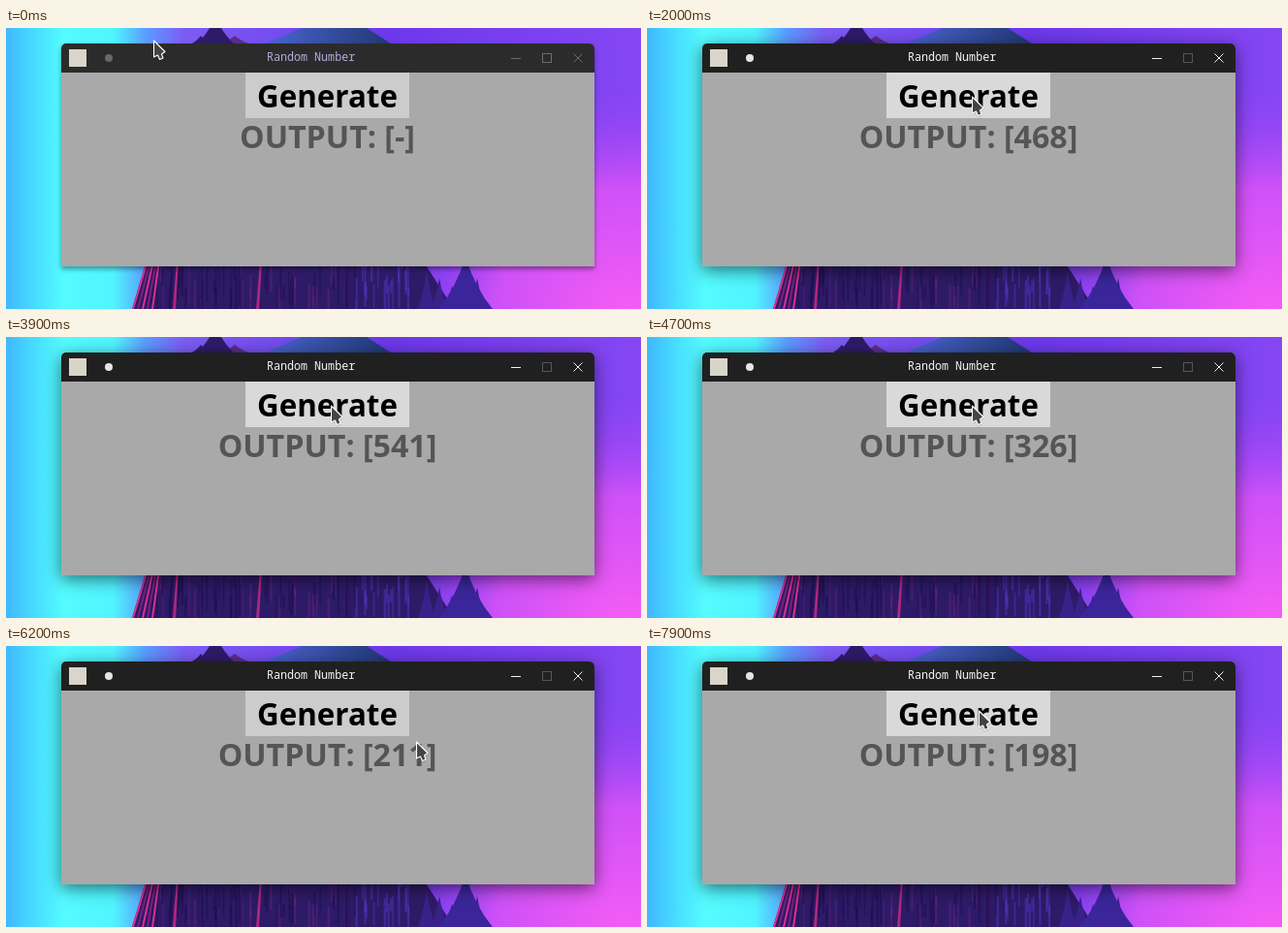
These frames come from a looping animation (655x290 px, 8000 ms). An HTML page with a canvas:

```html
<!DOCTYPE html>
<html lang="en">
<head>
<meta charset="utf-8">
<title>Random Number</title>
<style>
html, body { margin: 0; width: 100%; height: 100%; overflow: hidden; background: #a9a9a9; }
canvas { display: block; width: 655px; height: 290px; }
</style>
</head>
<body>
<canvas id="stage" width="655" height="290"></canvas>
<script>
const W = 655, H = 290, LOOP = 8000, TICK = 100;
const ctx = document.getElementById('stage').getContext('2d');
const win = { x: 57, y: 16, w: 550, h: 230, bar: 30 };
const btn = { x: 247, y: 46, w: 169, h: 47 };
const MID = 331.5, FOCUS = 1500;

// pointer strokes: begin, end, where the tip arrives
const HOME = [153, 13];
const strokes = [
  [200, 700, 238, 143], [700, 1100, 289, 85], [1100, 1300, 333, 67], [1900, 2000, 336, 71],
  [5300, 5400, 322, 77], [5400, 5900, 472, 182], [5900, 6200, 424, 99],
  [6200, 6600, 219, 110], [6800, 7200, 434, 107], [7300, 7700, 343, 67]
];

// clicks come every half second, the first ones a little late, the last after a pause
const values = [372, 468, 806, 154, 67, 541, 326, 211, 198];
const releaseAt = i => i === values.length - 1 ? 7900 : 1400 + 500 * i + Math.max(0, 200 - 100 * i);

const smooth = p => p * p * (3 - 2 * p);

function pointerAt(t) {
  let [x, y] = HOME;
  for (const [from, to, tx, ty] of strokes) {
    if (t <= from) break;
    const p = smooth(Math.min(1, (t - from) / (to - from)));
    x += (tx - x) * p;
    y += (ty - y) * p;
  }
  return [Math.round(x), Math.round(y)];
}

function seeded(seed) {
  return () => (seed = (seed * 16807) % 2147483647) / 2147483647;
}

function addStops(fill, ...stops) {
  stops.forEach(([at, color]) => fill.addColorStop(at, color));
  return fill;
}

function poly(g, fill, ...pts) {
  g.beginPath();
  for (let i = 0; i < pts.length; i += 2) g.lineTo(pts[i], pts[i + 1]);
  g.closePath();
  g.fillStyle = fill;
  g.fill();
}

function spire(g, fill, x, top, half, base) {
  const waist = top + (base - top) * 0.6;
  g.beginPath();
  g.moveTo(x - half, base);
  g.quadraticCurveTo(x - half * 0.35, waist, x, top);
  g.quadraticCurveTo(x + half * 0.35, waist, x + half, base);
  g.fillStyle = fill;
  g.fill();
}

function drawSky(g) {
  g.fillStyle = addStops(g.createLinearGradient(0, 0, W, 0),
    [0, '#40b8ff'], [0.05, '#48e0ff'], [0.09, '#54fbff'], [0.17, '#50f4ff'],
    [0.22, '#5a9cff'], [0.28, '#7c5cf4'], [0.6, '#6c38ea'], [1, '#8646f4']);
  g.fillRect(0, 0, W, H);
  g.fillStyle = addStops(g.createRadialGradient(640, 300, 10, 640, 300, 240),
    [0, '#f45cf4'], [0.55, 'rgba(214,82,248,.9)'], [1, 'rgba(150,66,246,0)']);
  g.fillRect(400, 0, W - 400, H);
}

function drawRocks(g) {
  const rnd = seeded(41), dark = '#2e1b68';
  const facet = addStops(g.createLinearGradient(262, 0, 390, 0), [0, '#4c66d6'], [1, '#243a78']);
  poly(g, facet, 262, 18, 305, 0, 372, 0, 400, 18);
  spire(g, dark, 201, 8, 13, 18);
  spire(g, '#5c2c8c', 236, 8, 20, 18);
  spire(g, dark, 216, -12, 21, 18);

  poly(g, dark, 145, 240, 130, H, 462, H, 430, 240);
  for (let i = 0; i < 5; i++) spire(g, '#38228a', 434 + i * 13, 250 + (i % 3) * 8, 9, H);
  spire(g, '#3a269a', 474, 236, 28, H);

  // vertical grain, bluer towards the right
  for (let i = 0; i < 90; i++) {
    const x = 150 + rnd() * 270, y = 236 + rnd() * 34;
    g.fillStyle = x > 360 ? 'rgba(92,62,214,.4)' : rnd() < 0.3 ? 'rgba(140,40,140,.3)' : 'rgba(24,12,66,.4)';
    g.fillRect(x, y, 1 + rnd() * 1.5, 12 + rnd() * 40);
  }
  // lit edges on the left flank
  for (let i = 0; i < 5; i++) {
    const x = 145 + i * 3, foot = x - 15 + i * 2;
    poly(g, i % 2 ? '#7c2080' : '#e0308e', x, 240, x + 2, 240, foot + 2, H, foot, H);
  }
  for (const x of [176, 262]) poly(g, '#b0287e', x, 240, x + 2, 240, x - 1, H, x - 4, H);
}

function makeWallpaper() {
  const pic = document.createElement('canvas');
  pic.width = W;
  pic.height = H;
  const g = pic.getContext('2d');
  drawSky(g);
  drawRocks(g);
  return pic;
}

const wallpaper = makeWallpaper();

function framePath() {
  ctx.beginPath();
  ctx.roundRect(win.x, win.y, win.w, win.h, [5, 5, 0, 0]);
}

function label(text, x, y, font, color, align = 'center') {
  ctx.font = font;
  ctx.textAlign = align;
  ctx.fillStyle = color;
  ctx.fillText(text, x, y);
}

function line(color, x0, y0, x1, y1) {
  ctx.beginPath();
  ctx.moveTo(x0, y0);
  ctx.lineTo(x1, y1);
  ctx.strokeStyle = color;
  ctx.lineWidth = 1;
  ctx.stroke();
}

function drawWindow(t) {
  const focus = Math.max(0, Math.min(1, (t - FOCUS + TICK) / (2 * TICK)));
  const mix = (a, b) => a + (b - a) * focus;
  const grey = (a, b) => `rgb(${Array(3).fill(Math.round(mix(a, b)))})`;

  ctx.save();
  ctx.shadowColor = `rgba(0,0,0,${mix(0.38, 0.55)})`;
  ctx.shadowBlur = mix(5, 17);
  ctx.shadowOffsetY = mix(3, 4);
  ctx.fillStyle = '#a9a9a9';
  framePath();
  ctx.fill();
  ctx.restore();

  ctx.save();
  framePath();
  ctx.clip();
  ctx.fillStyle = grey(43, 32);
  ctx.fillRect(win.x, win.y, win.w, win.bar);
  ctx.restore();

  ctx.fillStyle = '#d9d6c9';
  ctx.fillRect(65, 22, 18, 18);
  ctx.beginPath();
  ctx.arc(106, 31, 4, 0, Math.PI * 2);
  ctx.fillStyle = grey(104, 228);
  ctx.fill();

  const title = focus ? '#f4f4f4' : t >= 1100 ? '#d2d2ea' : '#b2acdc';
  label('Random Number', 269, 34, '11.7px "Noto Sans Mono", monospace', title, 'left');

  const ink = grey(108, 238);
  line(ink, 521, 31.5, 531, 31.5);
  line(ink, 585.5, 26.5, 594.5, 35.5);
  line(ink, 594.5, 26.5, 585.5, 35.5);
  ctx.strokeStyle = grey(108, 86);
  ctx.strokeRect(553.5, 26.5, 9, 9);
}

function drawContent(t, x, y) {
  const over = x >= btn.x && x < btn.x + btn.w && y >= btn.y && y < btn.y + btn.h;
  const down = values.some((v, i) => t >= releaseAt(i) - TICK && t < releaseAt(i)) ? 1 : 0;
  const value = values.filter((v, i) => t >= releaseAt(i)).pop() ?? '-';
  const face = '"Open Sans", "Noto Sans", sans-serif';
  ctx.fillStyle = over ? '#d9d9d9' : '#cccccc';
  ctx.fillRect(btn.x, btn.y, btn.w, btn.h);
  label('Generate', MID + down, 81.5 + down, `bold 31.3px ${face}`, '#000');
  label(`OUTPUT: [${value}]`, MID, 124, `bold 32.2px ${face}`, '#555');
}

function drawPointer(x, y) {
  ctx.save();
  ctx.translate(x - 0.5, y);
  ctx.shadowColor = 'rgba(0,0,0,.3)';
  ctx.shadowBlur = 2;
  ctx.shadowOffsetY = 1;
  poly(ctx, '#444', 0, 0, 0, 17, 4, 15, 6, 19.5, 9.5, 18, 8, 14, 11.5, 11.5);
  ctx.shadowColor = 'transparent';
  ctx.lineJoin = 'round';
  ctx.lineWidth = 1.1;
  ctx.strokeStyle = '#fff';
  ctx.stroke();
  ctx.restore();
}

function draw(now) {
  const t = Math.floor((now % LOOP) / TICK) * TICK;
  const [x, y] = pointerAt(t);
  ctx.drawImage(wallpaper, 0, 0);
  drawWindow(t);
  drawContent(t, x, y);
  drawPointer(x, y);
}

let start;
function loop(now) {
  start ??= now;
  draw(Math.max(0, now - start));
  requestAnimationFrame(loop);
}
draw(0);
requestAnimationFrame(loop);
</script>
</body>
</html>
```
